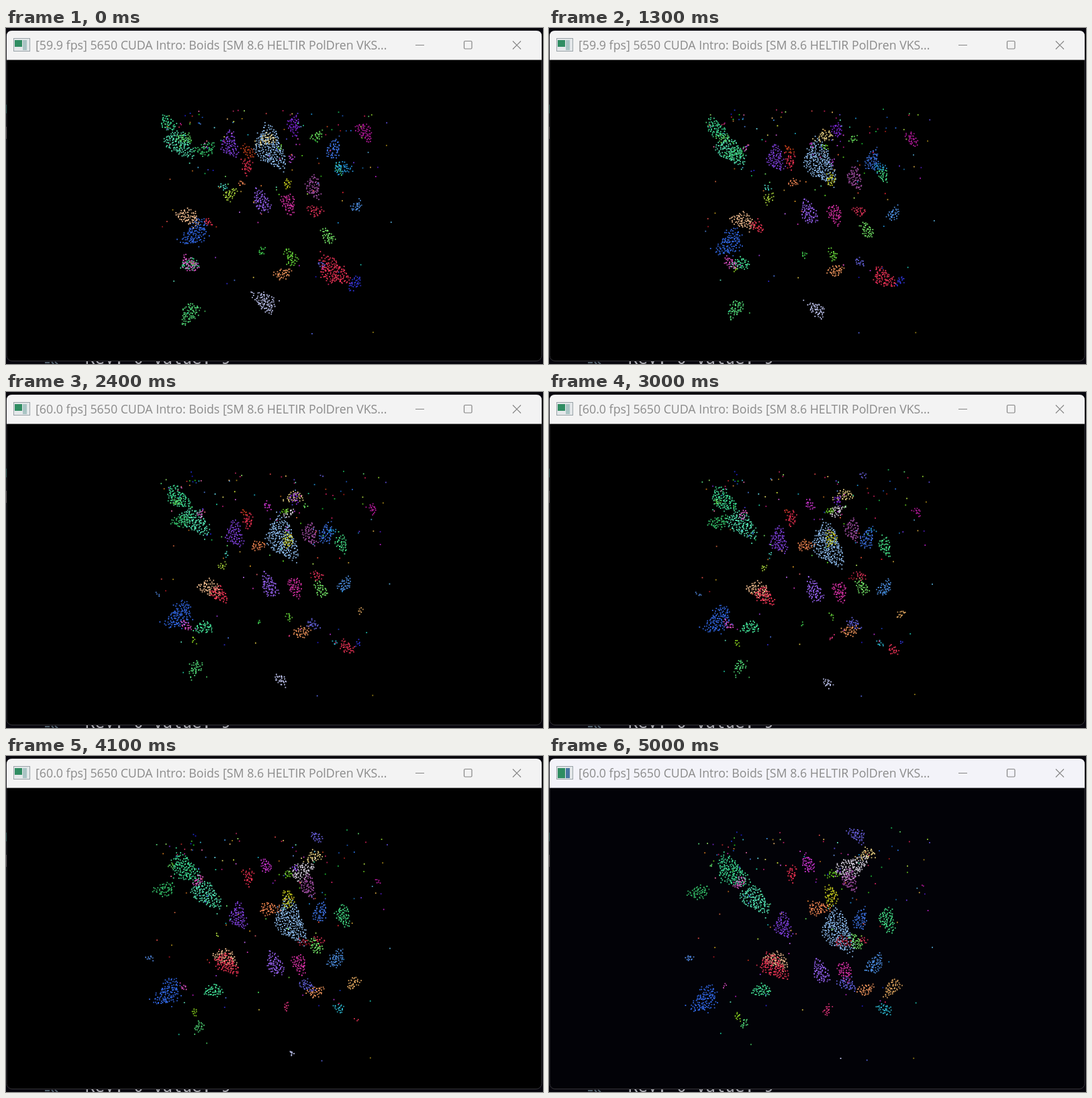
These frames come from a looping animation (800x500 px, 5100 ms). An HTML page with a canvas:

```html
<!DOCTYPE html>
<html lang="en">
<head>
<meta charset="utf-8">
<title>Boids</title>
<style>
  html, body { margin: 0; width: 100%; height: 100%; overflow: hidden; background: #08070e; }
  svg, canvas { position: absolute; left: 0; top: 0; width: 800px; height: 500px; }
  #title { font: 17.75px "Open Sans", sans-serif; fill: #8b8b8b; white-space: pre; }
  #under { font: 24px "DejaVu Sans Mono", monospace; fill: #a9a9b0; white-space: pre; }
</style>
</head>
<body>
<svg viewBox="0 0 800 500">
  <text id="under" x="118" y="499.5">Key: 0 value: 9</text>
  <path d="M58 498h7M68 497l3 3M73 497l4 3" stroke="#53636f" stroke-width="2"/>
  <path d="M0 114v13" stroke="#2c7a72" stroke-width="2"/>
  <path d="M0 147v18" stroke="#806f72" stroke-width="2"/>
  <rect id="view" x="1" y="4.5" width="797" height="491" rx="8" stroke="#353438"/>
  <path id="bar" d="M1 47.500V12q0-8 8-8H790q8 0 8 8V47.500z"/>
  <rect x="11.5" y="15.5" width="24" height="19" fill="#e4e8ea" stroke="#9aa3a8"/>
  <rect id="pane" x="13" y="18" width="11" fill="#2f8d62"/>
  <rect id="side" x="25" y="18" width="6" height="15"/>
  <text id="title" x="44" y="32"></text>
  <g fill="none" stroke="#858585" stroke-width="1.2">
    <path d="M610 25.500h13M755 19.500l12 12M767 19.500l-12 12"/>
    <rect x="682.500" y="19.500" width="11.500" height="11.500" rx="1.500"/>
  </g>
</svg>
<canvas id="sky" width="800" height="500"></canvas>
<script>
const $ = id => document.getElementById(id);
const ctx = $('sky').getContext('2d');
const LOOP = 5100, STEP = 100, TRAVEL = 5000;
const GOLDEN = Math.PI * (3 - Math.sqrt(5));
const flocks = [];

let seed = 5650;
function rand(min = 0, max = 1) {
  seed = seed + 0x6D2B79F5 | 0;
  let r = Math.imul(seed ^ seed >>> 15, 1 | seed);
  r = r + Math.imul(r ^ r >>> 7, 61 | r) ^ r;
  return min + (max - min) * ((r ^ r >>> 14) >>> 0) / 4294967296;
}
const mix = (a, b, u) => a + (b - a) * u;
const vivid = () => `hsl(${rand(0, 360)} 75% ${rand(40, 68)}%)`;

// A ragged spiral of boids, stretched along its heading, that glides from
// (x0,y0) to (x1,y1) while its radius goes from r0 to r1 (below 0 is hidden).
function flock(color, x0, y0, x1, y1, r0, r1 = r0) {
  const size = Math.max(r0, r1), count = Math.ceil(size * size * Math.PI / 8);
  const heading = Math.atan2(y1 - y0, x1 - x0), lump = rand(0, 6.3);
  const cos = Math.cos(heading), sin = Math.sin(heading);
  const boids = Array.from({ length: count }, (_, i) => {
    const angle = i * GOLDEN, stray = rand() < .04 ? 1.4 : 1;
    const r = Math.sqrt((i + .5) / count) * size * stray * (1 + .2 * Math.sin(3 * angle + lump));
    const along = Math.cos(angle) * r * 1.28 + rand(-1, 1);
    const across = Math.sin(angle) * r * .78 + rand(-1, 1);
    return {
      x: along * cos - across * sin, y: along * sin + across * cos,
      sway: rand(0, 6.3), light: rand(.75, 1)
    };
  });
  flocks.push({ color, x0, y0, x1, y1, r0, r1, size, boids });
}

// The flocks that lead the picture.
flock('#58f0bd', 257, 172, 306, 213, 19);
flock('#42eca0', 240, 141, 272, 172, 11, 21);
flock('#36c46c', 296, 180, 222, 202, 12);
flock('#8443e4', 333, 173, 348, 252, 15);
flock('#98caff', 393, 178, 430, 261, 25);
flock('#f0d888', 388, 165, 473, 145, 10);
flock('#f83456', 358, 205, 361, 174, 9);
flock('#f88a55', 350, 230, 401, 226, 5, 13);
flock('#e4ddec', 393, 192, 450, 165, -4, 19);
flock('#a852aa', 457, 236, 447, 184, 13);
flock('#4078ec', 487, 180, 463, 243, 12);
flock('#48ea8e', 495, 208, 503, 243, 7, 14);
flock('#a068ff', 380, 257, 404, 320, 14);
flock('#ea36b4', 420, 261, 440, 320, 12);
flock('#7cf46e', 479, 309, 457, 276, 10);
flock('#356ef2', 281, 304, 231, 362, 18);
flock('#ffc898', 270, 280, 338, 303, 14);
flock('#fc385a', 300, 288, 334, 313, 6, 18);
flock('#48f0a2', 273, 351, 316, 348, 11);
flock('#fa365c', 487, 361, 529, 398, 20, -1);
flock('#fa9c60', 411, 365, 471, 347, 10);
flock('#56e47e', 273, 424, 290, 397, 14, 6);
flock('#5094ea', 522, 264, 484, 309, 8, 13);
flock('#ccd2ff', 385, 407, 434, 449, 15, 2);

// Small flocks that drift, grow and fade, then single boids.
for (let i = 0; i < 26; i++) {
  const x = rand(235, 560), y = rand(128, 395), grows = rand() < .5;
  const big = rand(5, 12), small = rand(-6, 7);
  flock(vivid(), x, y, x + rand(-40, 40), y + rand(-25, 45), grows ? small : big, grows ? big : small);
}
for (let i = 0; i < 130; i++) {
  const x = rand(230, 576), y = mix(121, 490, rand() * rand());
  flock(vivid(), x, y, x + rand(-20, 20), y + rand(-20, 20), 1);
}

function draw(ms) {
  const u = ms / TRAVEL, late = ms >= 4400;
  const fps = ms < 2100 ? '59.9' : ms >= 3100 && ms < 4100 ? '60.1' : '60.0';
  $('title').textContent = `[${fps} fps] 5650 CUDA Intro: Boids [SM 8.6 HELTIR PolDren VKS...`;
  $('view').setAttribute('fill', late ? '#020207' : '#000');
  $('bar').setAttribute('fill', late ? '#f3f3f9' : '#f3f3f3');
  $('pane').setAttribute('height', late ? 15 : 10);
  $('side').setAttribute('fill', late ? '#4774a0' : '#a9c4c4');

  ctx.clearRect(0, 0, 800, 500);
  for (const f of flocks) {
    const x = mix(f.x0, f.x1, u), y = mix(f.y0, f.y1, u);
    const radius = Math.max(0, mix(f.r0, f.r1, u));
    const shown = f.boids.length * (radius / f.size) ** 2;
    ctx.fillStyle = f.color;
    for (const b of f.boids.slice(0, shown)) {
      ctx.globalAlpha = b.light;
      ctx.fillRect(x + b.x + Math.sin(u * 9 + b.sway), y + b.y + Math.cos(u * 8 + b.sway), 1.8, 1.8);
    }
  }
}

let last = -1;
function tick() {
  const ms = Math.floor(performance.now() % LOOP / STEP) * STEP;
  if (ms !== last) draw(last = ms);
  requestAnimationFrame(tick);
}
tick();
</script>
</body>
</html>
```
